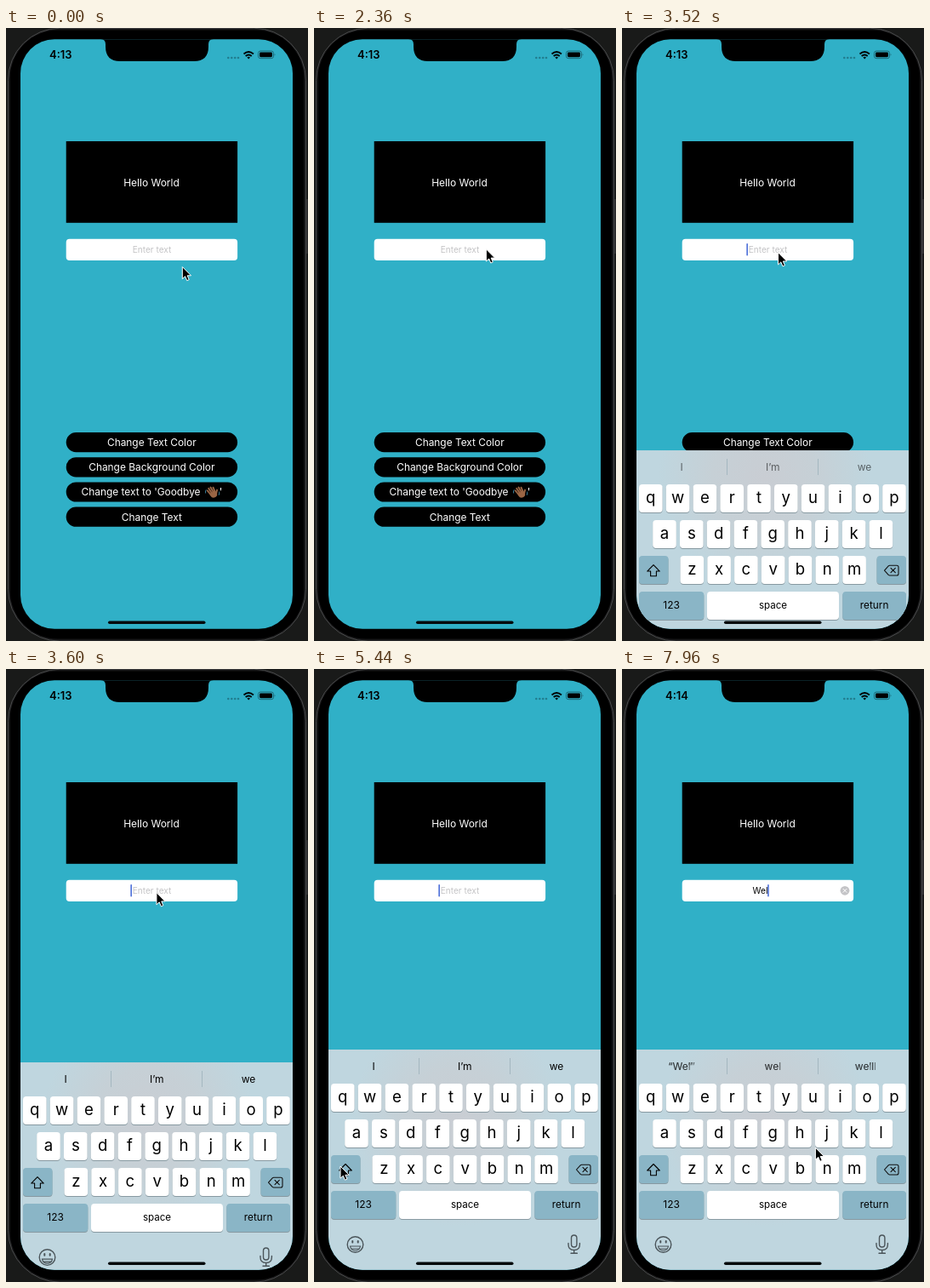
Recreate the animation shown at these times as an HTML page. Size 355x720 px, loop 8000 ms.

```html
<!DOCTYPE html>
<html lang="en">
<head>
<meta charset="utf-8">
<title>Text field demo</title>
<style>
  html, body { margin: 0; width: 100%; height: 100%; overflow: hidden; background: #191a19; }
  svg { display: block; width: 355px; height: 720px; }
  text { font-family: Inter, Roboto, "Liberation Sans", sans-serif; }
  .mid { text-anchor: middle; }
</style>
</head>
<body>
<svg id="stage" viewBox="0 0 355 720" xmlns="http://www.w3.org/2000/svg">
  <defs>
    <clipPath id="screen"><rect x="17" y="13.3" width="320" height="692.5" rx="40"/></clipPath>
    <radialGradient id="glow" gradientUnits="userSpaceOnUse" cx="168" cy="530" r="125">
      <stop offset="0" stop-color="#c9cdd3"/>
      <stop offset=".5" stop-color="#c6d0d6"/>
      <stop offset="1" stop-color="#bfd6df"/>
    </radialGradient>
  </defs>

  <rect width="355" height="720" fill="#191a19"/>
  <rect x="352.5" y="201" width="2.5" height="64" fill="#2c2c2d"/>
  <rect x="2.5" y=".2" width="350" height="720" rx="61" fill="#161617" stroke="#4a4b4c"/>
  <rect x="5" y="2.5" width="345" height="715" rx="56" fill="#000"/>

  <g clip-path="url(#screen)">
    <rect x="17" y="13" width="320" height="693" fill="#30b0c7"/>

    <rect x="70.700" y="133" width="201.400" height="95.800"/>
    <text class="mid" x="171" y="186" font-size="12" fill="#fff">Hello World</text>

    <rect x="70.700" y="247.700" width="201.400" height="25.200" rx="4" fill="#fff"/>
    <text id="hint" class="mid" x="171.500" y="264" font-size="10.100" fill="#c4c4c6">Enter text</text>
    <text id="typed" class="mid" x="162.500" y="264" font-size="10.100"></text>
    <rect id="caret" y="253" width="1.500" height="14.500" rx=".7" fill="#3f64d6"/>
    <g id="clear">
      <circle cx="262" cy="260.300" r="5.400" fill="#c4c4c7"/>
      <path d="M260 258.300l4 4m0-4l-4 4" stroke="#fff" stroke-linecap="round"/>
    </g>

    <g id="buttons" font-size="11.900"></g>
    <g transform="translate(242.800 545.500) rotate(-32)" fill="none" stroke="#9a6544" stroke-linecap="round">
      <path d="M-3.300 0L-4-5M-1.200 0L-1.400-6.500M1-.5L1.200-6.300M3 0L3.700-4.600M2.500 4L6 .3" stroke-width="1.900"/>
      <path d="M-4.200-.5H4V3Q3.500 6.500 0 6.500Q-4.200 6.500-4.200 2Z" fill="#9a6544" stroke="none"/>
      <path d="M-5-6.500q-1.800 .8-2.200 2.800M4.800 6.300q1.800-1 2.200-2.600" stroke="#3f8fb0" stroke-width=".9"/>
    </g>

    <rect id="panel" x="17" width="320" height="262" fill="url(#glow)"/>
    <g id="keyboard">
      <path d="M123.500 10v19M230.500 10v19" stroke="#a4b7c0"/>
      <g id="hints" font-size="12"></g>
      <g id="keys" class="mid"></g>
      <path id="shift" d="M37 134.500l7.300 7.500h-3.900v5.700h-6.800V142h-3.900Z" stroke="#000" stroke-width="1.100" stroke-linejoin="round"/>
      <g fill="none" stroke="#111" stroke-width="1.100" stroke-linecap="round" stroke-linejoin="round">
        <path d="M308.500 141l4.700-5.200q.6-.6 1.400-.6h8.400q2 0 2 2v7.800q0 2-2 2h-8.400q-.8 0-1.400-.6Z"/>
        <path d="M316 138.300l5.300 5.300m0-5.300l-5.300 5.300"/>
      </g>
      <g fill="none" stroke="#4b555a" stroke-width="1.400" stroke-linecap="round">
        <circle cx="48.500" cy="229" r="9.300"/>
        <path d="M42.500 231h12q-1 5-6 5t-6-5ZM43.500 234h10" stroke-width="1.200"/>
        <path d="M45.300 225v1.600M51.700 225v1.600" stroke-width="2"/>
        <rect x="302.500" y="218" width="6.400" height="14" rx="3.200"/>
        <path d="M299 227.500v1.500q0 6.500 6.700 6.500t6.700-6.500v-1.500M305.700 235.500v3.500M302 239.200h7.400"/>
      </g>
    </g>
    <rect x="120" y="696.500" width="114.500" height="3.600" rx="1.800" fill="#050a0c"/>

    <path d="M111 13Q117 13 117 19V22Q117 39 134 39H221Q238 39 238 22V19Q238 13 244 13Z"/>
    <text id="clock" x="51" y="36" font-size="13" font-weight="600"></text>
    <g fill="#217d8f">
      <circle cx="261.300" cy="35" r="1.300"/><circle cx="265.300" cy="35" r="1.300"/>
      <circle cx="269.200" cy="35" r="1.300"/><circle cx="273" cy="35" r="1.300"/>
    </g>
    <g fill="none" stroke="#000" stroke-width="1.900">
      <path d="M279.500 30.500q5.700-5.200 11.400 0M281.700 33q3.500-3.200 7 0"/>
      <path d="M283.400 34.500q1.800-1.500 3.600 0l-1.800 1.900Z" fill="#000" stroke="none"/>
    </g>
    <rect x="296.500" y="27" width="18" height="8.700" rx="2.600" fill="none" stroke="#1d6877"/>
    <rect x="298" y="28.500" width="15" height="5.700" rx="1.400"/>
    <path d="M315.700 29.800q1.700 1.500 0 3Z" fill="#1d6877"/>
  </g>

  <path id="cursor" d="M0 0V14.200L3.300 11.200L5.400 16.200L7.900 15.100L5.800 10.300H10.200Z" stroke="#fff" stroke-width="1" stroke-linejoin="round"/>
</svg>

<script>
const LOOP = 8000;
const $ = id => document.getElementById(id);

function add(parent, tag, attrs, label) {
  const el = document.createElementNS("http://www.w3.org/2000/svg", tag);
  for (const k in attrs) el.setAttribute(k, attrs[k]);
  if (label) el.textContent = label;
  parent.appendChild(el);
  return el;
}

// Buttons
const buttonY = i => 475 + 29.2 * i;
["Change Text Color", "Change Background Color", "Change text to 'Goodbye", "Change Text"].forEach((label, i) => {
  const y = buttonY(i);
  add($("buttons"), "rect", { x: 70.7, y, width: 201.4, height: 23.2, rx: 11.6 });
  const pos = i === 2 ? { x: 88.5 } : { x: 171.3, class: "mid" };
  add($("buttons"), "text", { ...pos, y: y + 16, fill: "#fff" }, label);
});
add($("buttons"), "text", { x: 250.8, y: buttonY(2) + 16, fill: "#fff" }, "'");

// Keyboard, placed relative to its top edge
const letters = [];
function key(x, y, w, label, size, fill = "#fff") {
  const box = { x, width: w, height: 33, rx: 4 };
  add($("keys"), "rect", { ...box, y: y + 1, fill: "#8799a1" });
  const face = add($("keys"), "rect", { ...box, y, fill });
  const text = add($("keys"), "text", { x: x + w / 2, y: y + (size > 15 ? 22 : 20.3), "font-size": size }, label);
  if (size > 15) letters.push(text);
  return face;
}
[["qwertyuiop", 20], ["asdfghjkl", 36.2], ["zxcvbnm", 68.5]].forEach(([row, x], r) =>
  [...row].forEach((c, i) => key(x + 31.8 * i, 40 + 42 * r, 27.6, c, 18.6)));
const GREY = "#8ab5c6";
const shiftKey = key(20, 124, 34.5, "", 12, GREY);
key(299.5, 124, 34.5, "", 12, GREY);
key(20, 166, 76.3, "123", 12, GREY);
key(100, 166, 155, "space", 11.6);
key(259.3, 166, 74.7, "return", 11.8, GREY);

// Suggestions: two layers that cross-fade
const slots = [70, 177.3, 285];
const layers = [0, 1].map(() => slots.map(() => add($("hints"), "text", { y: 24 })));
const hints = [
  [0, "", "", ""],
  [3440, "I", "I’m", "we"],
  [6590, "“W”", "", ""],
  [6960, "“We”", "we", "we’ll"],
  [7880, "“Wel”", "wel", "well"]
];

const typing = [[3320, ""], [6570, "W"], [6940, "We"], [7860, "Wel"]];

// Pointer path: time, x, y
const path = [
  [0, 207.3, 280.5], [520, 207.3, 280.5], [800, 205.5, 272], [1440, 205.5, 272],
  [1560, 202.8, 262], [1720, 202.8, 262], [1760, 202.5, 261.6], [2320, 202.5, 261.6],
  [2360, 202.4, 259.8], [2800, 193, 264.5], [2960, 193, 264.5], [3200, 189.6, 265.8], [3400, 189.6, 265.8],
  [3600, 177, 262.6], [3800, 158, 282], [4200, 105, 400], [4560, 62, 505],
  [5000, 36, 575], [5240, 31, 584], [5600, 31, 584], [6000, 50, 535],
  [6320, 61, 500], [6560, 62, 500], [6720, 94, 499.3], [6900, 94, 499.3],
  [7400, 250, 530], [7660, 304, 541], [7840, 304, 541], [7960, 228, 562], [8000, 206, 568]
];

const clamp = v => Math.max(0, Math.min(1, v));
const lastAt = (list, t) => list.reduce((found, e, i) => e[0] <= t ? i : found, -1);

function slope(i, d) {
  if (!path[i - 1] || !path[i + 1]) return 0;
  const rate = j => (path[j + 1][d] - path[j][d]) / (path[j + 1][0] - path[j][0]);
  const a = rate(i - 1), b = rate(i);
  return a * b <= 0 ? 0 : 2 * a * b / (a + b);
}

// Monotone cubic interpolation
function along(t, d) {
  const i = Math.min(lastAt(path, t), path.length - 2);
  const p = path[i], q = path[i + 1], h = q[0] - p[0], u = (t - p[0]) / h;
  const s = u * u * (3 - 2 * u);
  return p[d] + (q[d] - p[d]) * s
    + h * u * (1 - u) * ((1 - u) * slope(i, d) - u * slope(i + 1, d));
}

// Critically damped spring
function keyboardTop(t) {
  if (t < 3357) return 720;
  const w = 18.7 * (t - 3357) / 1000;
  return t >= 3780 ? 447 : 447 + 259 * (1 + w) * Math.exp(-w);
}

function drawField(t) {
  const n = lastAt(typing, t);
  const text = n < 0 ? "" : typing[n][1];
  $("typed").textContent = text;
  $("hint").setAttribute("visibility", text ? "hidden" : "visible");
  $("clear").setAttribute("visibility", text ? "visible" : "hidden");
  const x = text ? 162.5 + $("typed").getComputedTextLength() / 2 - .2 : 146.4;
  $("caret").setAttribute("x", x);
  let alpha = 0;
  if (n >= 0) {
    const phase = (t - typing[n][0]) % 1000;
    alpha = phase < 900 ? 1 - clamp((phase - 500) / 100) : (phase - 900) / 100;
  }
  $("caret").setAttribute("opacity", alpha);
}

// Both layers share the left edge of the newer word
function drawHints(t) {
  const n = lastAt(hints, t);
  const mix = clamp((t - hints[n][0]) / 150);
  slots.forEach((center, i) => {
    const older = layers[0][i], newer = layers[1][i];
    older.textContent = n ? hints[n - 1][i + 1] : "";
    newer.textContent = hints[n][i + 1];
    const width = (newer.textContent ? newer : older).getComputedTextLength();
    [older, newer].forEach((el, k) => {
      el.setAttribute("x", center - width / 2);
      el.setAttribute("opacity", k ? mix : 1 - mix);
    });
  });
}

function drawKeyboard(t) {
  const upper = t >= 5600 && t < 6570;
  const top = keyboardTop(t);
  $("panel").setAttribute("y", top);
  $("keyboard").setAttribute("transform", `translate(0 ${top})`);
  letters.forEach(el => {
    const c = el.textContent;
    el.textContent = upper ? c.toUpperCase() : c.toLowerCase();
  });
  shiftKey.setAttribute("fill", upper ? "#fff" : GREY);
  $("shift").setAttribute("fill", upper ? "#000" : "none");
}

function render(t) {
  drawField(t);
  drawHints(t);
  drawKeyboard(t);
  $("clock").textContent = t < 7600 ? "4:13" : "4:14";
  $("cursor").setAttribute("transform", `translate(${along(t, 1)} ${along(t, 2)})`);
}

function tick(now) {
  render(now % LOOP);
  requestAnimationFrame(tick);
}
render(0);
requestAnimationFrame(tick);
</script>
</body>
</html>
```
